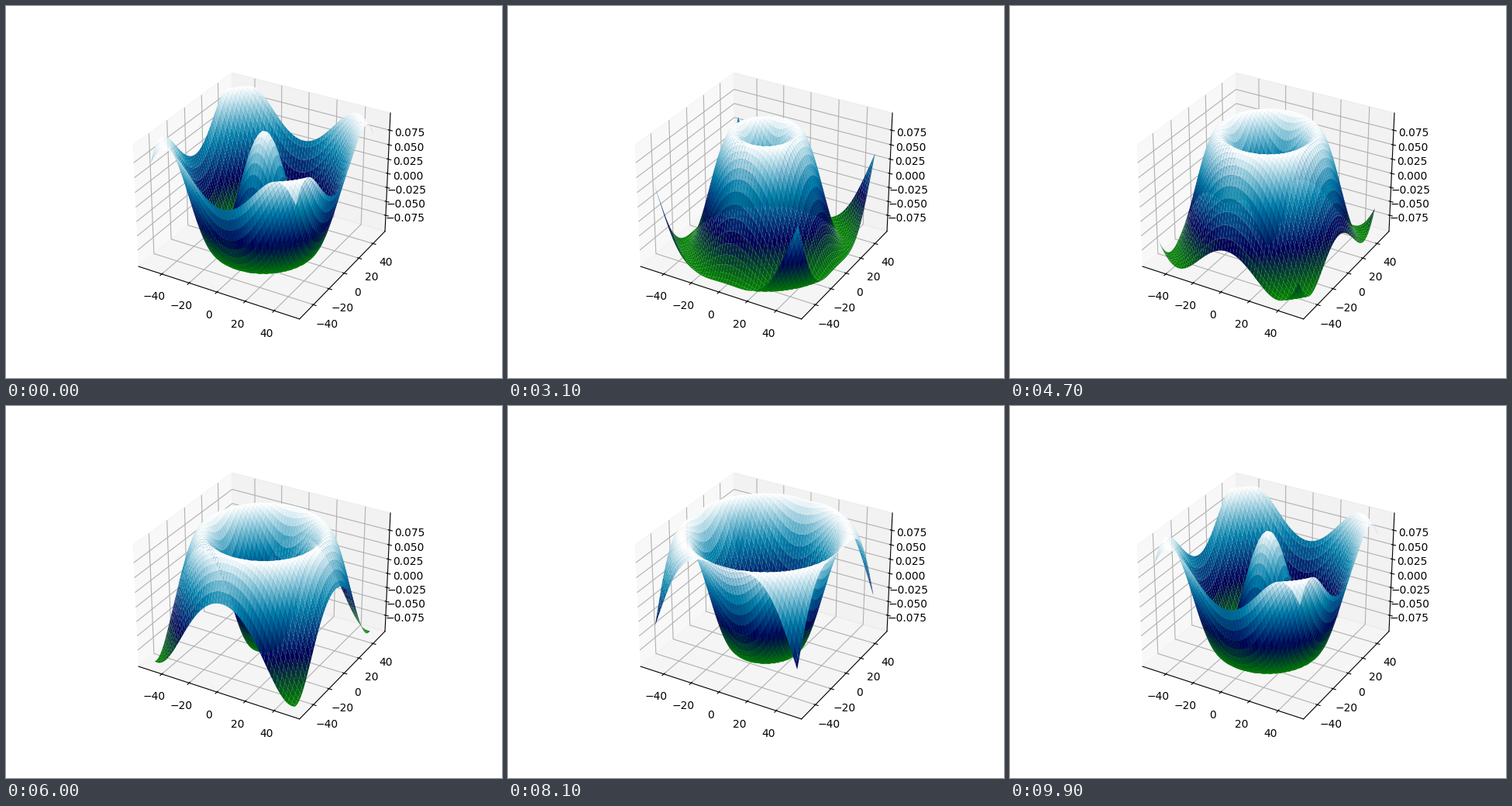
Recreate the animation shown at these times as a matplotlib script. Size 640 by 480 pixels, loop 10 s.

```python
import matplotlib.pyplot as plt
import numpy as np
from matplotlib.animation import FuncAnimation
from mpl_toolkits.mplot3d.art3d import Poly3DCollection

FRAMES = 100
EDGE = 25 / 24  # margin between the limits and the drawn box


def quads(a):
    """Corners of every grid cell, shape (cells, 4)."""
    corners = (a[:-1, :-1], a[:-1, 1:], a[1:, 1:], a[1:, :-1])
    return np.stack([c.ravel() for c in corners], axis=1)


grid = np.append(np.linspace(-50, 50, 100)[::2], 50)
X, Y = np.meshgrid(grid, grid)
R = np.hypot(X, Y)
qx, qy = quads(X), quads(Y)


def wave(phase):
    qz = quads(0.1 * np.cos(0.1 * R - phase))
    return np.stack([qx, qy, qz], axis=2), qz.mean(axis=1)


fig = plt.figure(figsize=(6.4, 4.8), dpi=100, facecolor="white")
ax = fig.add_subplot(projection="3d")
ax.set_xlim(-55 * EDGE, 55 * EDGE)
ax.set_ylim(-55 * EDGE, 55 * EDGE)
ax.set_zlim(-0.1 * EDGE, 0.1 * EDGE)
ax.set_xticks(range(-40, 41, 20))
ax.set_yticks(range(-40, 41, 20))
ax.set_zticks(np.arange(-3, 4) * 0.025)

verts, heights = wave(0)
surface = Poly3DCollection(verts, cmap="ocean")
surface.set_array(heights)
ax.add_collection3d(surface)


def update(i):
    verts, heights = wave(2 * np.pi * i / (FRAMES - 1))
    surface.set_verts(verts)
    surface.set_array(heights)
    surface.autoscale()
    return (surface,)


anim = FuncAnimation(fig, update, frames=FRAMES, interval=100,
                     repeat=True, repeat_delay=0, blit=False)
plt.show()
```
